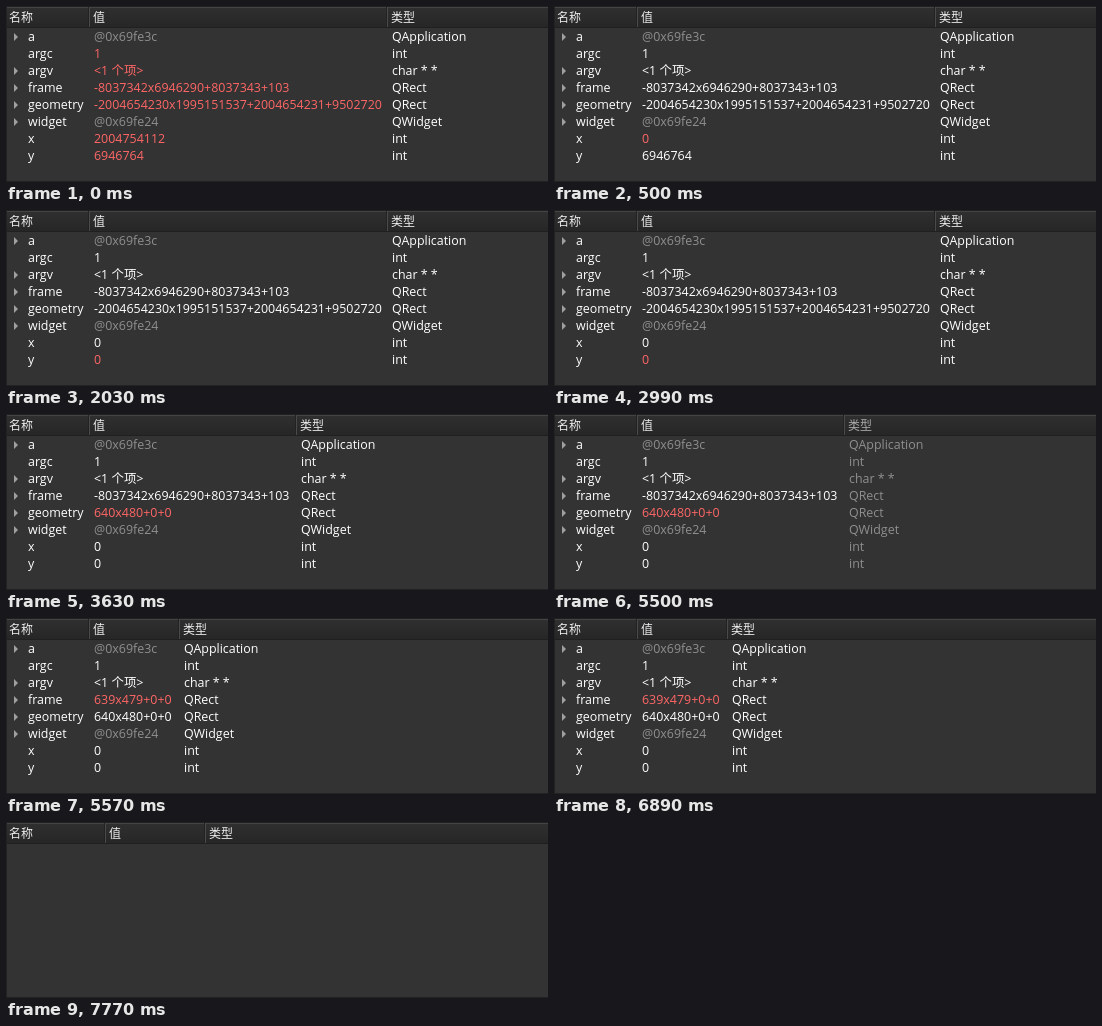
Write an HTML page that moves like this. It is 542 px wide and 176 px high and loops after 8000 ms.

```html
<!DOCTYPE html>
<html lang="zh-CN">
<meta charset="utf-8">
<style>
html, body { margin: 0; height: 100%; overflow: hidden; background: #333; }
svg { display: block; font: 12.45px "Open Sans", "Noto Sans CJK SC", "Noto Sans CJK", sans-serif; }
text { white-space: pre; }
.head { font-size: 12px; }
</style>
<svg id="view" width="542" height="176" viewBox="0 0 542 176"></svg>
<script>
const WHITE = '#fff', GREY = '#8f8f8f', RED = '#ff6666';
const LOOP = 8000;
const FRAME = '-8037342x6946290+8037343+103';
const GEOMETRY = '-2004654230x1995151537+2004654231+9502720';
const names = ['a', 'argc', 'argv', 'frame', 'geometry', 'widget', 'x', 'y'];
const types = ['QApplication', 'int', 'char * *', 'QRect', 'QRect', 'QWidget', 'int', 'int'];
const expandable = ['a', 'argv', 'frame', 'geometry', 'widget'];

// Each step: start time, separator positions, changed values, red rows
const steps = [
  { at: 0, cols: [83, 381], set: { frame: FRAME, geometry: GEOMETRY, x: '2004754112', y: '6946764' },
    red: ['argc', 'argv', 'frame', 'geometry', 'x', 'y'] },
  { at: 500, cols: [83, 381], set: { x: '0' }, red: ['x'] },
  { at: 2030, cols: [83, 381], set: { y: '0' }, red: ['y'] },
  { at: 3630, cols: [83, 290], set: { geometry: '640x480+0+0' }, red: ['geometry'] },
  { at: 5500, cols: [83, 290], set: {}, red: ['geometry'], dim: true },
  { at: 5570, cols: [83, 173], set: { frame: '639x479+0+0' }, red: ['frame'] },
  { at: 7770, cols: [99, 199], set: {}, red: [], empty: true }
];

let values = { a: '@0x69fe3c', argc: '1', argv: '<1 个项>', widget: '@0x69fe24' };
for (const s of steps) s.values = values = { ...values, ...s.set };

const rect = (x, y, w, h, fill) =>
  `<rect x="${x}" y="${y}" width="${w}" height="${h}" fill="${fill}"/>`;
const label = (x, y, str, fill, cls = '') =>
  `<text x="${x}" y="${y}" fill="${fill}" class="${cls}">${str.replace(/</g, '&lt;')}</text>`;

function header([c1, c2], dim) {
  let out = '<linearGradient id="bar" x2="0" y2="1"><stop stop-color="#303030"/>' +
    '<stop offset="1" stop-color="#262626"/></linearGradient>' +
    rect(0, 0, 542, 176, '#333') + rect(0, 0, 542, 22, 'url(#bar)') +
    rect(0, 0, 542, 1, '#202020') + rect(0, 1, 542, 1, '#444') + rect(0, 21, 542, 1, '#202020') +
    rect(0, 0, 1, 176, '#222') + rect(0, 175, 542, 1, '#222');
  for (const x of [c1, c2]) out += rect(x - 1, 1, 1, 20, '#222') + rect(x, 1, 1, 20, '#4a4a4a');
  return out + label(3, 16, '名称', '#eee', 'head') + label(c1 + 4, 16, '值', '#eee', 'head') +
    label(c2 + 4, 16, '类型', dim ? '#aaa' : '#eee', 'head');
}

function row(name, i, s) {
  const y = 35 + 17 * i, value = s.values[name], [c1, c2] = s.cols;
  const color = s.red.includes(name) ? RED : value[0] === '@' ? GREY : WHITE;
  const arrow = expandable.includes(name) ? `<path d="M8 ${y - 8}l4 4l-4 4z" fill="#a0a0a0"/>` : '';
  return arrow + label(22, y, name, WHITE) + label(c1 + 5, y, value, color) +
    label(c2 + 5, y, types[i], s.dim ? GREY : WHITE);
}

const view = document.getElementById('view');
let shown;
function tick(now) {
  const t = now % LOOP;
  const s = steps.findLast(step => step.at <= t);
  if (s !== shown) {
    shown = s;
    view.innerHTML = header(s.cols, s.dim) +
      (s.empty ? '' : names.map((name, i) => row(name, i, s)).join(''));
  }
  requestAnimationFrame(tick);
}
tick(0);
</script>
</html>
```
